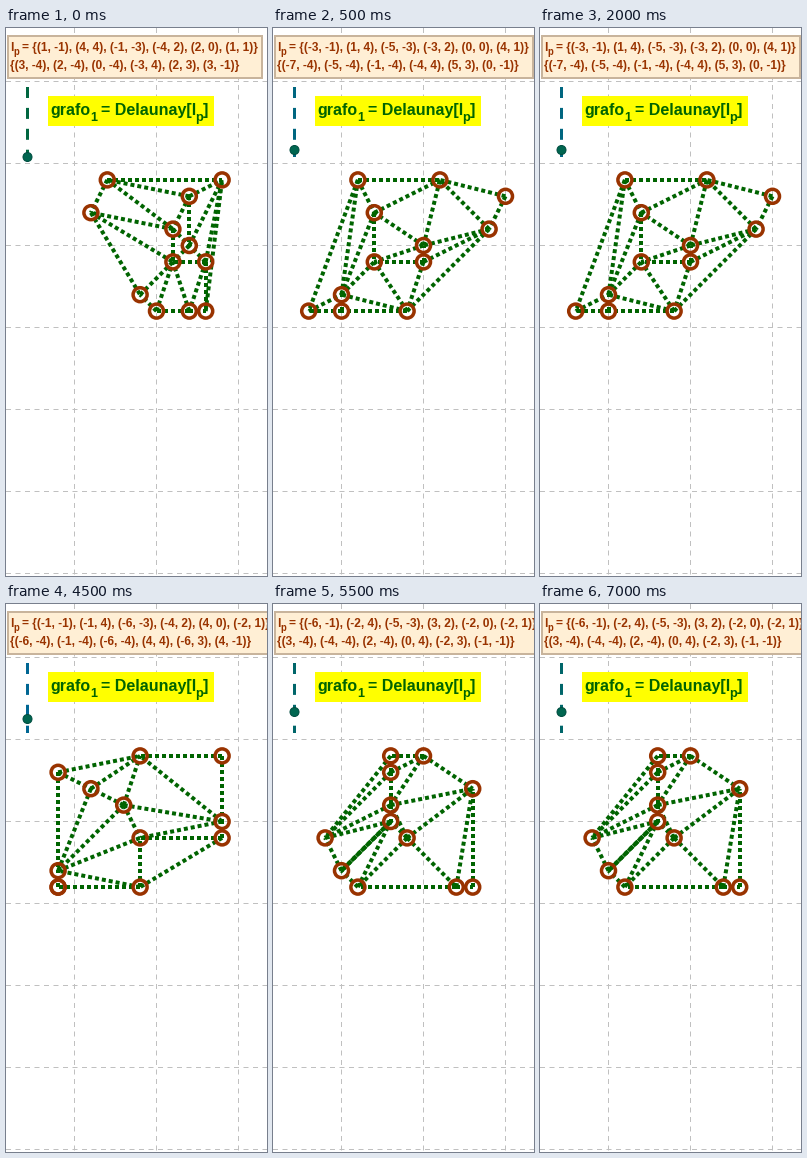
These frames come from a looping animation (261x548 px, 8000 ms). A matplotlib script:

```python
import math

import numpy as np
import matplotlib.pyplot as plt
from matplotlib.animation import FuncAnimation
from matplotlib.collections import LineCollection
from matplotlib.patches import Circle, Rectangle
from matplotlib.tri import Triangulation

W, H, DPI = 261, 548, 64
PX = 72 / DPI                 # points per pixel
ORIGIN = np.array([150.5, 217.5])
UNIT = 16.4
STEP_MS = 500

BROWN, GREEN = "#993300", "#006400"

# every state keeps the heights and redraws the abscissas
YS = [-1, 4, -3, 2, 0, 1, -4, -4, -4, 4, 3, -1]
XS = [
    [1, 4, -1, -4, 2, 1, 3, 2, 0, -3, 2, 3],
    [-3, 1, -5, -3, 0, 4, -7, -5, -1, -4, 5, 0],
    [-1, -1, -6, -4, 4, -2, -6, -1, -6, 4, -6, 4],
    [-6, -2, -5, 3, -2, -2, 3, -4, 2, 0, -2, -1],
]
TWICE = [(-5, -3), (-2, 0)]   # an edge laid down in both directions


def to_pixels(points):
    return ORIGIN + np.array(points, float) * (UNIT, -UNIT)


def delaunay_segments(points):
    pts = np.array(points, float)
    # the slight stretch settles ties between cocircular points
    mesh = Triangulation(pts[:, 0] * 1.001, pts[:, 1])
    segments = list(to_pixels(pts)[mesh.edges])
    if set(TWICE) <= set(points):
        segments += [to_pixels(TWICE), to_pixels(TWICE[::-1])]
    return segments


def braces(points):
    return "{" + ", ".join(f"({x}, {y})" for x, y in points) + "}"


def dashes(width):
    # on/off lengths in units of the line width
    on = (width * 8 / 3 + 8 if width > 1 else 5) / width
    return 0, (on, .9 * on)


def label(x, y, text, size, color):
    return ax.text(x - 1, y, text, family="Liberation Sans", weight="bold",
                   size=size * PX, color=color, va="baseline", zorder=6)


fig = plt.figure(figsize=(W / DPI, H / DPI), dpi=DPI, facecolor="white")
ax = fig.add_axes([0, 0, 1, 1])
ax.set_xlim(0, W)
ax.set_ylim(H, 0)
ax.axis("off")

# grid
grid = dict(color="#c0c0c0", lw=PX, ls=(0, (5, 4.5)), zorder=1, snap=False)
for x in range(68, W, 82):
    ax.plot([x + .5] * 2, [0, H], **grid)
for y in range(53, H, 82):
    ax.plot([0, W], [y + .5] * 2, **grid)

# triangulated points
edges = LineCollection([], colors=GREEN, linewidths=4 * PX,
                       linestyles=[(0, (1, .75))], zorder=2)
ax.add_collection(edges, autolim=False)
rings = ax.scatter(YS, YS, s=(14 * PX) ** 2, facecolors="none",
                   edgecolors=BROWN, linewidths=3.5 * PX, zorder=3)

# slider
track, = ax.plot([21.5, 21.5], [59, 129], lw=3 * PX, snap=False,
                 ls=(0, (11 / 3, 3.3)), dash_capstyle="butt", zorder=4)
knob = Circle((21.5, 129), 4.5, fc="#006650", ec="#004d40", lw=PX, zorder=5)
ax.add_patch(knob)

# list box
box = Rectangle((2, 8), 254, 42, fc="#ffefd5", ec="#c8b49c",
                lw=2 * PX, zorder=5)
ax.add_patch(box)
label(5, 23, "l", 11.87, BROWN)
label(8, 27, "p", 9.6, BROWN)
row1 = label(17, 23, "", 11.87, BROWN)
row2 = label(5, 41, "", 11.87, BROWN)

# command label
ax.add_patch(Rectangle((42, 68), 166, 30, fc="#ffff00", ec="none", zorder=5))
for x, y, text, size in [(45, 87, "grafo", 16), (85, 93, "1", 12.8),
                         (96, 87, "= Delaunay[l", 16),
                         (190, 93, "p", 12.8), (198, 87, "]", 16)]:
    label(x, y, text, size, GREEN)


def show(i):
    # the first state lasts one step, the others five
    k = (i + 4) // 5
    points = list(zip(XS[k], YS))
    edges.set_segments(delaunay_segments(points))
    rings.set_offsets(to_pixels(points))
    track.set_color((0, .4, .25 + .33 * math.sin(math.pi * k / 3.6)))
    knob.center = 21.5, 129 - 7 * k
    first = braces(points[:6])
    row1.set_text("= " + first)
    row2.set_text(braces(points[6:]))
    box.set_width(238 + 4 * first.count("-"))
    return edges, rings, track, knob, row1, row2, box


anim = FuncAnimation(fig, show, frames=16, interval=STEP_MS,
                     init_func=lambda: show(0), repeat=True,
                     cache_frame_data=False)
plt.show()
```
